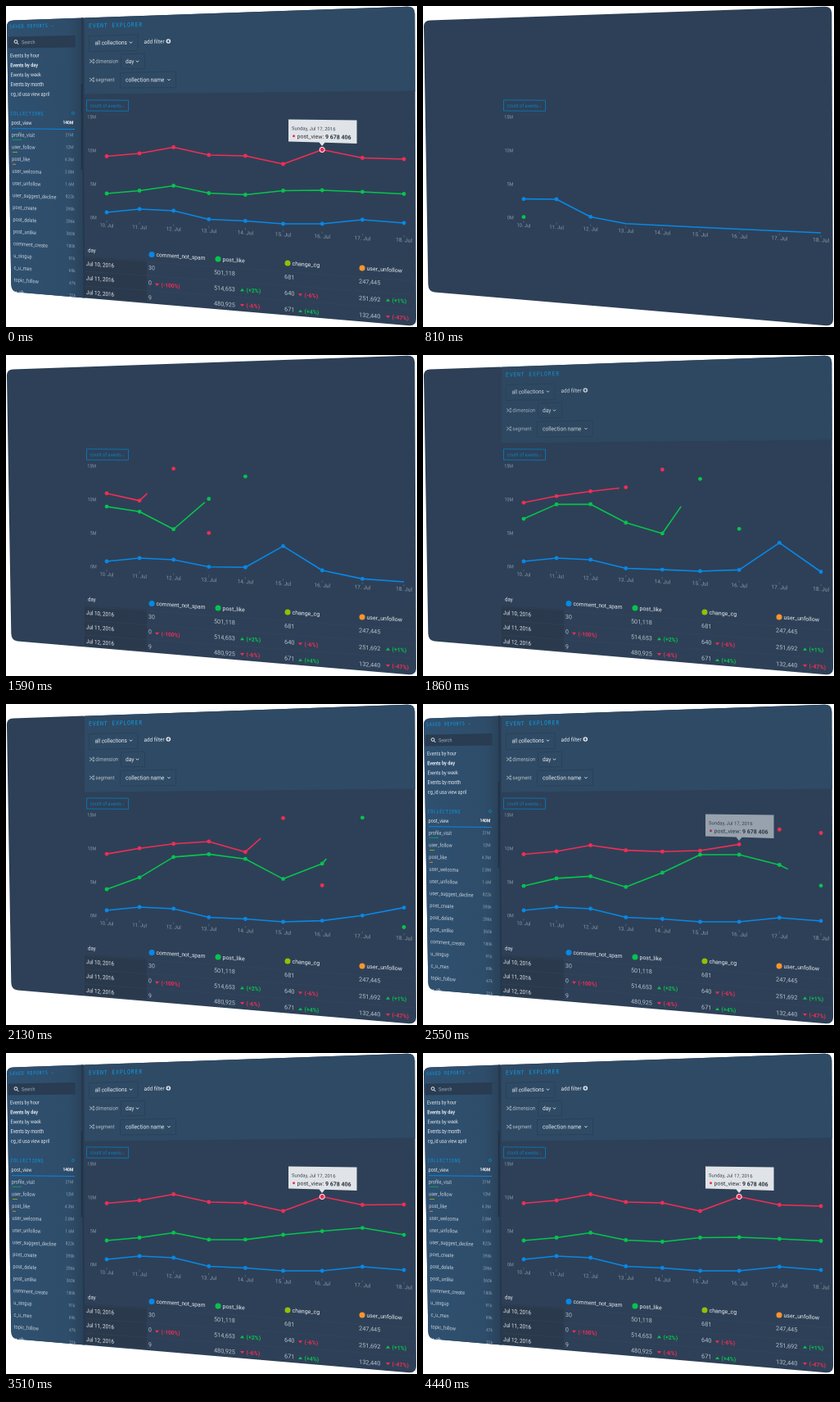
Recreate the animation shown at these times as an HTML page. Size 502x392 px, loop 6 s.

```html
<!DOCTYPE html>
<html lang="en">
<head>
<meta charset="utf-8">
<title>Event explorer</title>
<style>
  html, body { margin: 0; width: 100%; height: 100%; overflow: hidden; background: #fff; }
  svg { display: block; width: 502px; height: 392px; }
  text { font-family: Roboto, "Open Sans", sans-serif; white-space: pre; }
  .heading { font-family: "Noto Sans Mono", "DejaVu Sans Mono", monospace; }
  .line { fill: none; stroke-width: 1.6; stroke-linejoin: round; }
</style>
</head>
<body>
<svg viewBox="0 0 502 392">
  <defs>
    <clipPath id="panel"><path d="M1 27Q0 18 9 17.600L490 .8Q499 .3 499.300 9L501 382Q501 391 492 390.200L14 349.500Q6.500 348.500 6.300 340Z"/></clipPath>
    <linearGradient id="sideFill">
      <stop offset="0" stop-color="#2f5070"/><stop offset=".8" stop-color="#2e4d6a"/><stop offset="1" stop-color="#2a4159"/>
    </linearGradient>
  </defs>
  <g clip-path="url(#panel)">
    <rect width="502" height="392" fill="#2e4057"/>
    <g id="table"></g>
    <g id="header"></g>
    <g id="sidebar"></g>
    <g id="axes"></g>
    <g id="chart"></g>
    <g id="tooltip"></g>
  </g>
</svg>
<script>
const LOOP = 6000, CUT = 450;
const BLUE = '#0788e6', GREEN = '#05c44e', RED = '#f02d57', GREY = '#b5c0cb', PALE = '#e6ebf0', SKY = '#0aa0ec';
const $ = id => document.getElementById(id);

function add(parent, tag, attrs, content) {
  const el = document.createElementNS('http://www.w3.org/2000/svg', tag);
  for (const key in attrs) el.setAttribute(key, attrs[key]);
  if (content) el.textContent = content;
  parent.append(el);
  return el;
}

// Rows fan out and widen to the right, as the panel is seen at an angle.
const slope = y => (y - 95) * 0.0003;
const squeeze = x => Math.min(1, 0.83 + x * 0.0006);

function label(parent, x, y, content, size = 7, fill = GREY, extra = {}) {
  const matrix = [squeeze(x), slope(y), 0, 1, x, y + size * 0.35];
  return add(parent, 'text', { transform: `matrix(${matrix})`, 'font-size': size, fill, ...extra }, content);
}
const heading = (parent, x, y, content, size, spacing) =>
  label(parent, x, y, content, size, SKY, { class: 'heading', 'letter-spacing': spacing });
const path = (parent, d, attrs) => add(parent, 'path', { d, fill: 'none', ...attrs });
const dot = (parent, cx, cy, r, fill) => add(parent, 'circle', { cx, cy, r, fill });
const bold = { 'font-weight': 700 };
const right = { 'text-anchor': 'end' };

function buildSidebar(g) {
  path(g, 'M0 14L95 10V360L0 352Z', { fill: 'url(#sideFill)' });
  path(g, 'M93 14L95.500 357', { stroke: '#24384e', 'stroke-width': 2 });
  path(g, 'M92.500 95V200', { stroke: '#1f3044', 'stroke-width': 1.5 });
  heading(g, 4, 25, 'SAVED REPORTS –', 6.2, 0.68);
  path(g, 'M3 38L84 36.500V50L3 51Z', { fill: '#293c52', stroke: '#26384c', 'stroke-width': .6 });
  add(g, 'circle', { cx: 12, cy: 43.5, r: 1.9, fill: 'none', stroke: PALE });
  path(g, 'M13.500 45L15.300 47', { stroke: PALE });
  label(g, 19, 44.2, 'Search', 6.4, '#9aa8b6');
  ['Events by hour', 'Events by day', 'Events by week', 'Events by month', 'cg_id usa view april'].forEach((name, i) =>
    label(g, 5 + i * 0.2, 60.5 + i * 11.7, name, 6.6, PALE, i == 1 ? bold : {}));
  heading(g, 5.5, 131, 'COLLECTIONS', 6.2, 0.73);
  add(g, 'circle', { cx: 82, cy: 131, r: 1.6, fill: 'none', stroke: '#0788c8', 'stroke-width': .8 });
  const rows = ['post_view 140M', 'profile_visit 21M', 'user_follow 12M', 'post_like 4.3M', 'user_welcome 2.8M',
    'user_unfollow 1.6M', 'user_suggest_decline 822k', 'post_create 390k', 'post_delete 286k', 'post_unlike 360k',
    'comment_create 180k', 'u_singup 91k', 'c_u_men 69k', 'topic_follow 47k', 'u_ab 31k'];
  rows.forEach((row, i) => {
    const [name, count] = row.split(' '), x = 6.6 + i * 0.25, y = 142.3 + i * 14.75;
    label(g, x, y, name, 6.7, i ? '#c3ced8' : PALE);
    label(g, 82.2 + i * 0.22, y + i * 0.35, count, 5.6, i ? '#8c9fb1' : '#fff', i ? right : { ...right, ...bold });
  });
  [['M7 149.700L84 150.500', BLUE], ['M7.500 163.300H19', '#129a64'], ['M8 178.500H14', '#8ba51f'], ['M8 193.300H12', '#d98527']]
    .forEach(([d, stroke]) => path(g, d, { stroke }));
}

function buildHeader(g) {
  path(g, 'M96 10L502 -4V104L96 108Z', { fill: '#2f4a64' });
  path(g, 'M96 108L502 104', { stroke: '#2a4259', 'stroke-width': .8 });
  heading(g, 101, 24, 'EVENT EXPLORER', 7.4, 0.85);
  ['M101.500 36.500L161 35V54.500L101.500 55.500Z', 'M140.500 59L169.500 58V76.500L140.500 77Z', 'M139.500 81.500L207.500 80V99.500L139.500 100Z']
    .forEach(d => path(g, d, { stroke: '#2a425b' }));
  label(g, 108.5, 45, 'all collections', 7.2, PALE);
  label(g, 168.5, 43.5, 'add filter', 6.9, PALE);
  dot(g, 198.3, 43, 2.8, PALE);
  path(g, 'M196.700 43H199.900M198.300 41.400V44.600', { stroke: '#2f4a64' });
  [['dimension', 67.5], ['segment', 90]].forEach(([name, y]) => {
    path(g, `M102 ${y - 1.7}h1l2.700 3.400h2M102 ${y + 1.7}h1l2.700 -3.400h2`, { stroke: GREY, 'stroke-width': .8 });
    path(g, `M106.600 ${y - 3}l1.400 1.300l-1.400 1.300m0 .8l1.400 1.300l-1.400 1.300`, { stroke: GREY, 'stroke-width': .7 });
    label(g, 109.3, y, name, 6.7, GREY);
  });
  label(g, 146, 67.5, 'day', 7.2, PALE);
  label(g, 146, 90, 'collection name', 7.3, PALE);
  [[152.5, 44.5], [160.5, 67.5], [199, 90]].forEach(([x, y]) =>
    path(g, `M${x - 1.6} ${y - .8}l1.600 1.700l1.600 -1.700`, { stroke: PALE, 'stroke-width': .9 }));
}

function buildTable(g) {
  path(g, 'M96 306L172 311V361L96 355Z', { fill: '#2a394c' });
  [307, 324, 342].forEach(y => path(g, `M96 ${y}L502 ${y + 29}`, { stroke: '#33475d', 'stroke-width': .6 }));
  label(g, 100, 298, 'day', 6.8, PALE);
  [['comment_not_spam', 178, 303.4, BLUE], ['post_like', 259, 309, GREEN], ['change_cg', 344, 314, '#91c008'], ['user_unfollow', 435, 320, '#fa952c']]
    .forEach(([name, x, y, fill]) => {
      dot(g, x, y, 3.5, fill);
      label(g, x + 5.5, y + .2, name, 7, PALE);
    });
  const rows = [['30', '501,118', '681', '247,445'],
    ['0 -100%', '514,653 +2%', '640 -6%', '251,692 +1%'],
    ['9', '480,925 -6%', '671 +4%', '132,440 -47%']];
  const valueX = [174, 254, 340, 431], changeX = [182, 286, 357, 464];
  rows.forEach((row, r) => {
    label(g, 98, 314.5 + r * 17.5, `Jul ${10 + r}, 2016`, 7.1, PALE);
    row.forEach((cell, c) => {
      const [value, change] = cell.split(' ');
      const y = 319.5 + c * 5.5 + r * (18.2 + c * .75);
      label(g, valueX[c], y, value, 7.4, GREY);
      if (!change) return;
      const up = change[0] == '+', fill = up ? GREEN : RED, x = changeX[c], cy = y + 2.6;
      path(g, up ? `M${x} ${cy + 1.6}h5l-2.500 -3.400z` : `M${x} ${cy - 1.6}h5l-2.500 3.400z`, { fill });
      label(g, x + 7.5, cy + .2, `(${change})`, 6.9, fill, bold);
    });
  });
}

const dayX = i => 123 + 39.3 * i + 0.76 * i * i;
const baseY = i => 259 + 2.25 * i;

function buildAxes(g) {
  path(g, 'M98.500 114.800L149.500 115.200V128.300L98.500 128Z', { stroke: '#0878b8', 'stroke-width': .9 });
  label(g, 102.5, 121.5, 'count of events ↓', 6.3, '#0880c4');
  ['15M', '10M', '5M', '0M'].forEach((name, i) => label(g, 110 + i * .2, 135.5 + i * 41, name, 6, '#8997a5', right));
  for (let i = 0; i < 9; i++) {
    const x = dayX(i), y = baseY(i);
    path(g, `M${x} ${y + 3}v2.500`, { stroke: '#5d6f82', 'stroke-width': .7 });
    label(g, x, y + 8.8, `${10 + i}. Jul`, 6.3 + i * .06, '#8997a5', { 'text-anchor': 'middle' });
  }
}

function buildTooltip(g) {
  path(g, 'M345 138.500L428.500 139.500V168L389.500 166.800L386 171L382.500 166.500L345 165.500Z', { fill: '#e0e4e8' });
  label(g, 349, 149.3, 'Sunday, Jul 17, 2016', 5.9, '#3c4650');
  dot(g, 351.5, 158.8, 1.5, RED);
  const line = label(g, 355.5, 159, 'post_view: ', 7, '#28323c');
  add(line, 'tspan', bold, '9 678 406');
}

// Piecewise curve through [time, value] keys.
const smooth = u => (1 - Math.cos(Math.PI * u)) / 2;
function curve(keys, t, ease = u => u) {
  if (t <= keys[0][0]) return keys[0][1];
  for (let k = 1; k < keys.length; k++) {
    const [t0, v0] = keys[k - 1], [t1, v1] = keys[k];
    if (t < t1) return v0 + (v1 - v0) * ease((t - t0) / (t1 - t0));
  }
  return keys[keys.length - 1][1];
}

// rest: settled heights; bounce: share of the jump above rest by age; head: how far the line is drawn.
const series = [
  { color: BLUE, start: 400, step: 165, jump: () => 36,
    rest: [252, 248, 250, 260.5, 262.5, 266, 266, 261, 265],
    bounce: [[195, .08], [340, 1], [465, .1], [690, .05], [850, 0]], head: [[0, 8]] },
  { color: GREEN, start: 800, step: 164, jump: y => y - 138,
    rest: [229, 225.5, 219.5, 228.5, 230.5, 225.5, 225, 227, 229.5],
    bounce: [[165, 1], [450, .08], [690, .45], [860, .5], [1330, .03], [1490, .16], [1900, .04], [2330, 0]],
    head: [[1000, 0], [1590, 2.88], [2130, 6.1], [2550, 7.2], [3000, 8]] },
  { color: RED, start: 975, step: 180, jump: y => y - 138,
    rest: [183.5, 180, 172.5, 182, 183, 193, 175.5, 185.5, 187],
    bounce: [[180, 1], [235, 1], [440, .05], [620, .32], [790, .05], [980, .09], [1200, 0]],
    head: [[1300, 0], [1590, 1.22], [2130, 4.4], [2550, 6], [3150, 8]] }
];
const red = series[2], picked = 6;

function heightAt(s, i, t) {
  const age = t - s.start - i * s.step, rest = s.rest[i], jump = s.jump(rest);
  if (age <= 0) return baseY(i);
  const launch = [0, (rest - baseY(i)) / jump];
  return rest - jump * curve([launch, ...s.bounce], age, smooth);
}

function drawSeries(s, t) {
  const ys = s.rest.map((_, i) => heightAt(s, i, t));
  const head = curve(s.head, t), last = Math.floor(head), part = head - last;
  const points = ys.slice(0, last + 1).map((y, i) => [dayX(i), y]);
  if (part) points.push([dayX(last) + (dayX(last + 1) - dayX(last)) * part, ys[last] + (ys[last + 1] - ys[last]) * part]);
  s.line.setAttribute('points', head ? points.join(' ') : '');
  s.dots.forEach((el, i) => {
    el.setAttribute('cy', ys[i]);
    el.setAttribute('visibility', t >= s.start + i * s.step ? 'visible' : 'hidden');
  });
}

buildTable($('table'));
buildHeader($('header'));
buildSidebar($('sidebar'));
buildAxes($('axes'));
buildTooltip($('tooltip'));
for (const s of series) {
  s.line = add($('chart'), 'polyline', { class: 'line', stroke: s.color });
  s.dots = s.rest.map((y, i) => dot($('chart'), dayX(i), y, 2.4, s.color));
}
const marker = add($('chart'), 'circle', { cx: dayX(picked), r: 3.1, fill: RED, stroke: '#fff', 'stroke-width': 1 });

const fades = { table: [1080, 1450], header: [1650, 2000], sidebar: [2180, 2480], tooltip: [2340, 2920] };

function render(time) {
  let t = time % LOOP;
  if (t < CUT) t += LOOP;
  for (const id in fades) {
    const [from, to] = fades[id];
    const u = Math.min(1, Math.max(0, (t - from) / (to - from)));
    $(id).setAttribute('opacity', 1 - (1 - u) ** 2);
  }
  series.forEach(s => drawSeries(s, t));

  // The tooltip and its marker ride on the picked point.
  const y = heightAt(red, picked, t);
  $('tooltip').setAttribute('transform', `translate(0 ${y - red.rest[picked]})`);
  marker.setAttribute('cy', y);
  marker.setAttribute('visibility', t > 2950 ? 'visible' : 'hidden');
}

const origin = performance.now();
(function tick() {
  render(performance.now() - origin);
  requestAnimationFrame(tick);
})();
</script>
</body>
</html>
```
